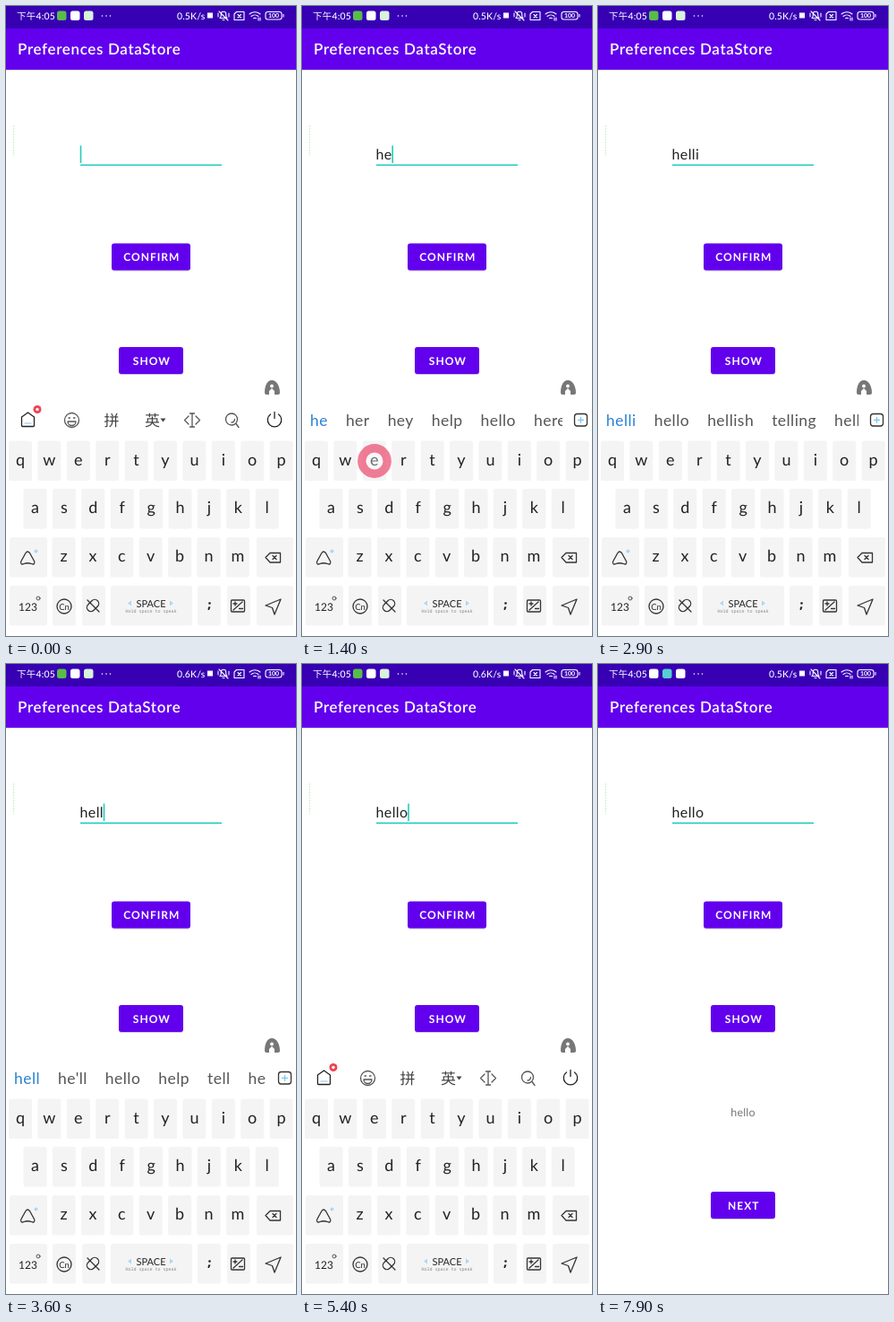
Recreate the animation shown at these times as an HTML page. Size 324 by 702 pixels, loop 8000 ms.

```html
<!DOCTYPE html>
<html lang="en">
<head>
<meta charset="utf-8">
<title>Preferences DataStore</title>
<style>
html, body { margin: 0; width: 100%; height: 100%; overflow: hidden; background: #fff; }
#stage { position: relative; width: 324px; height: 702px; overflow: hidden; font-family: Lato, "Noto Sans CJK SC", "Noto Sans CJK", sans-serif; }
svg, #kb { position: absolute; left: 0; top: 0; width: 324px; height: 702px; }
text { text-rendering: geometricPrecision; }
.btn { font: 700 12px Lato, sans-serif; letter-spacing: 1px; fill: #fff; text-anchor: middle; }
.key { font-size: 18px; fill: #222; text-anchor: middle; }
.line { fill: none; stroke: #333; stroke-width: 1.3; stroke-linecap: round; stroke-linejoin: round; }
.status { fill: none; stroke: #fff; stroke-width: 1.1; stroke-linecap: round; stroke-linejoin: round; }
#words { position: absolute; left: 9px; top: 449px; width: 282px; height: 25px; display: flex; gap: 20px; overflow: hidden; font-size: 17.5px; line-height: 25px; letter-spacing: .45px; color: #555; white-space: nowrap; }
#words span { flex: none; }
#words span:first-child { color: #2b82d4; }
</style>
</head>
<body>
<div id="stage">
  <svg viewBox="0 0 324 702">
    <path d="M0 71h324v1H0z" fill="#e4e0ea"/>
    <path d="M0 0h324v71H0z" fill="#6200ee"/>
    <path d="M0 0h324v25H0z" fill="#3700b3"/>
    <g fill="#fff" font-size="10.5" font-weight="500">
      <text x="12" y="14.5" letter-spacing=".2">下午4:05</text>
      <text id="speed" x="191" y="14.5" letter-spacing=".15"></text>
      <g id="apps"></g>
      <circle cx="107.5" cy="11" r=".8"/><circle cx="112" cy="11" r=".8"/><circle cx="116.5" cy="11" r=".8"/>
      <rect x="225" y="7.5" width="6" height="6"/>
      <text x="299" y="13.3" font-size="7" font-weight="700" text-anchor="middle">100</text>
    </g>
    <g class="status">
      <path d="M239 13.5h8l-1.2-2V9a2.8 2.8 0 0 0-5.6 0v2.5zM242 15.5h2M238 6l10 10M237 8v4M249 8v4"/>
      <path d="M257.5 6.500h8.500v9h-11v-6.500zM259 9.500l3.500 3.500M262.500 9.500l-3.500 3.500"/>
      <path d="M272 9a9 9 0 0 1 12 0M274 11.500a6 6 0 0 1 8 0M276.500 13.700a3 3 0 0 1 3 0M282 13v3M284 13v3"/>
      <rect x="290" y="6.500" width="18" height="8.500" rx="2.500"/><path d="M310 9.500v2.500"/>
    </g>
    <text x="13" y="54" font-size="17" font-weight="600" letter-spacing=".65" fill="#fff">Preferences DataStore</text>
    <path d="M8.500 133v34" stroke="#d5f2d5" stroke-width="1.500" stroke-dasharray="2 1"/>
    <path d="M83 177.300h158" stroke="#20cdbd" stroke-width="1.500"/>
    <text id="field" x="82.500" y="170.500" font-size="16" letter-spacing=".4" fill="#222"></text>
    <path id="caret" d="M0 155.500v19.500" stroke="#20cdbd" stroke-width="1.600"/>
    <g id="buttons"></g>
    <text id="result" x="162" y="503.500" font-size="12.500" letter-spacing=".2" text-anchor="middle" fill="#757575">hello</text>
  </svg>

  <div id="kb">
    <svg viewBox="0 0 324 702">
      <path d="M0 438h324v264H0z" fill="#fff"/>
      <path d="M289 431c0-8 3-14 8-14s9 6 9 14q0 2-2 2h-4v-4l-3-3-3 3v4h-3q-2 0-2-2z" fill="#777"/>
      <circle cx="297" cy="423.500" r="1.900" fill="#fff"/>
      <g id="keys"></g>
      <g class="line">
        <path d="M17 621.500q-1-1 0-3l5-9q2-3 4.500 0l5 9q1 2 0 3-1 1-3 0-4.500-1.500-8.500 0-2 1-3 0z"/>
        <path d="M290 614.500l5-5h11.500v10.500h-11.500zM298 612.500l4 4M302 612.500l-4 4"/>
        <circle cx="36" cy="660" r="2" stroke-width=".8"/>
        <circle cx="65" cy="669" r="8"/>
        <rect x="-4.500" y="-7.500" width="9" height="15" rx="4.500" transform="translate(97 668) rotate(45)"/>
        <path d="M91 662l13 13"/>
        <rect x="251.500" y="662" width="15" height="13" rx="1"/>
        <path d="M254 673l10-9M254 666h4M256 664v4M260.500 671.500h4"/>
        <path d="M290 668l17-7-7 17-2.500-7.500z"/>
      </g>
      <circle cx="33.500" cy="607.500" r="2" fill="#acd8f8"/>
      <g class="key">
        <text x="24.500" y="673.500" style="font-size:12px">123</text>
        <text x="65" y="672.500" style="font-size:9.500px">Cn</text>
        <text x="162" y="669.500" style="font-size:11px">SPACE</text>
        <text x="162" y="676" style="font:5px 'Noto Sans Mono',monospace;fill:#888">Hold space to speak</text>
        <circle cx="227.500" cy="665.500" r="1.300"/><path d="M226 669.500h2.500l-1.500 3.500h-1.500z"/>
      </g>
      <path d="M140 662.500v6l-4-3zM183 662.500v6l4-3z" fill="#a9d8f8"/>
      <g id="tools">
        <g class="line" style="stroke:#555">
          <path d="M17.500 458l7-5 7 5v9.500q0 1-1 1h-12q-1 0-1-1z" stroke="#222"/>
          <path d="M21 465h7" stroke="#a9d8f8"/>
          <circle cx="73.500" cy="461.500" r="8"/>
          <path d="M69 463a4.500 4.500 0 0 0 9 0zM70 459h1.500M75.500 459h1.500"/>
          <path d="M204 457l-4.500 4.500 4.500 4.500M212 457l4.500 4.500-4.500 4.500M205.500 454h5M208 454v15M205.500 469h5"/>
          <circle cx="252" cy="460.500" r="6.500"/><path d="M257 465.500l3 4M252 464a3.500 3.500 0 0 0 3.500-3.500"/>
          <path d="M295.500 455a7.700 7.700 0 1 0 9 0M300 452.500v7" stroke="#222"/>
        </g>
        <path d="M172.500 459.500h6l-3 4z" fill="#444"/>
        <circle cx="35" cy="449.500" r="4.500" fill="#ee4455"/><circle cx="35" cy="449.500" r="1.700" fill="#fff"/>
        <g font-size="17" fill="#444"><text x="109.500" y="467.500">拼</text><text x="155" y="467.500">英</text></g>
      </g>
      <g id="more" class="line">
        <rect x="304.500" y="454.500" width="14" height="13.500" rx="3"/>
        <path d="M308.500 461.300h6M311.500 458.300v6" stroke="#7cc4f0"/>
      </g>
    </svg>
    <div id="words"></div>
  </div>

  <svg viewBox="0 0 324 702">
    <g id="touch"><circle id="hole" r="9.500" fill="#fff"/><circle id="ring" fill="none" stroke="#ec4f72"/></g>
  </svg>
</div>

<script>
const $ = id => document.getElementById(id);
const LOOP = 8000;

// Text edits: [time, field text, suggestions]
const edits = [
  [0, "", ""],
  [1150, "h", "h he have has her had him"],
  [1400, "he", "he her hey help hello here"],
  [1700, "hel", "hel help hello held hell"],
  [1950, "hell", "hell he'll hello help tell hello"],
  [2350, "helli", "helli hello hellish telling hell"],
  [3350, "hell", "hell he'll hello help tell hello"],
  [4000, "hello", "hello hellos jello Bello Hallo"]
];
const PICK = 4550, HIDE = 5950, SHOWN = 7150;

// Taps: [start, x, y]
const taps = [
  [1050, 194, 560], [1300, 81, 507], [1600, 290, 562], [1850, 288, 564],
  [2250, 243, 507], [3250, 299, 614], [3900, 275, 507], [4350, 19, 461],
  [5700, 163, 281], [7050, 163, 396]
];
const TAP = 300, HOLE = 9.5;

const rect = (x, y, w, h, r, fill) =>
  `<rect x="${x}" y="${y}" width="${w}" height="${h}" rx="${r}" fill="${fill}"/>`;
const key = (x, y, w) => rect(x, y, w, 44.5, 2.5, "#f5f4f5");

const button = (label, x, y, w) =>
  rect(x, y + 1, w, 30, 3, "#d3cadf") + rect(x, y, w, 30, 3, "#6200ee") +
  `<text class="btn" x="${x + w / 2 + 0.8}" y="${y + 19.5}">${label}</text>`;

$("buttons").innerHTML = button("CONFIRM", 118, 264.5, 88) +
  button("SHOW", 126, 380, 72) + button("NEXT", 126, 588, 72);

const row = (letters, cx, y) => [...letters].map((c, i) => {
  const x = cx + i * 32.4;
  return key(x - 13, y, 26) + `<text class="key" x="${x}" y="${y + 27}">${c}</text>`;
}).join("");

$("keys").innerHTML =
  row("qwertyuiop", 16, 484.5) + row("asdfghjkl", 32.5, 538) + row("zxcvbnm", 64.5, 592) +
  [[4, 592, 42], [280, 592, 41], [4, 646, 42], [52, 646, 26], [85, 646, 26],
   [117, 646, 91], [214, 646, 26], [247, 646, 26], [280, 646, 41]].map(k => key(...k)).join("");

const setHtml = (el, html) => {
  if (el.shown !== html) el.innerHTML = el.shown = html;
};
const show = (el, on) => { el.style.visibility = on ? "visible" : "hidden"; };

function draw(t) {
  const [since, text, list] = edits.filter(e => e[0] <= t).pop();
  $("field").textContent = text;
  const end = text ? $("field").getComputedTextLength() + 83 : 83.5;
  $("caret").setAttribute("transform", `translate(${end} 0)`);
  show($("caret"), (t - since) % 1000 < 500);

  const words = list && t < PICK ? list.split(" ") : [];
  setHtml($("words"), words.map(w => `<span>${w}</span>`).join(""));
  show($("tools"), !words.length);
  show($("more"), words.length);

  const p = Math.min(1, Math.max(0, (t - HIDE) / 300));
  $("kb").style.transform = `translateY(${290 * p * p}px)`;
  show($("result"), t >= SHOWN);

  $("speed").textContent = t >= 3500 && t < 6500 ? "0.6K/s" : "0.5K/s";
  const colors = t < 6400 ? ["#58bd48", "#fff", "#d8f3dd"] : ["#fff", "#55cfd0", "#fff"];
  setHtml($("apps"), colors.map((c, i) => rect(57 + i * 15, 5.5, 10.5, 10.5, 2.5, c)).join(""));

  const tap = taps.find(([s]) => t >= s && t < s + TAP);
  show($("touch"), tap);
  if (tap) {
    // The ring widens outwards from its fixed hole as it fades.
    const a = (t - tap[0]) / TAP, band = 1.3 + 24 * a;
    $("touch").setAttribute("transform", `translate(${tap[1]} ${tap[2]})`);
    $("ring").setAttribute("r", HOLE + band / 2);
    $("ring").setAttribute("stroke-width", band);
    $("ring").setAttribute("opacity", 0.95 - 0.66 * a);
    $("hole").setAttribute("opacity", a);
  }
}

const start = performance.now();
function tick() {
  draw((performance.now() - start) % LOOP);
  requestAnimationFrame(tick);
}
tick();
</script>
</body>
</html>
```
